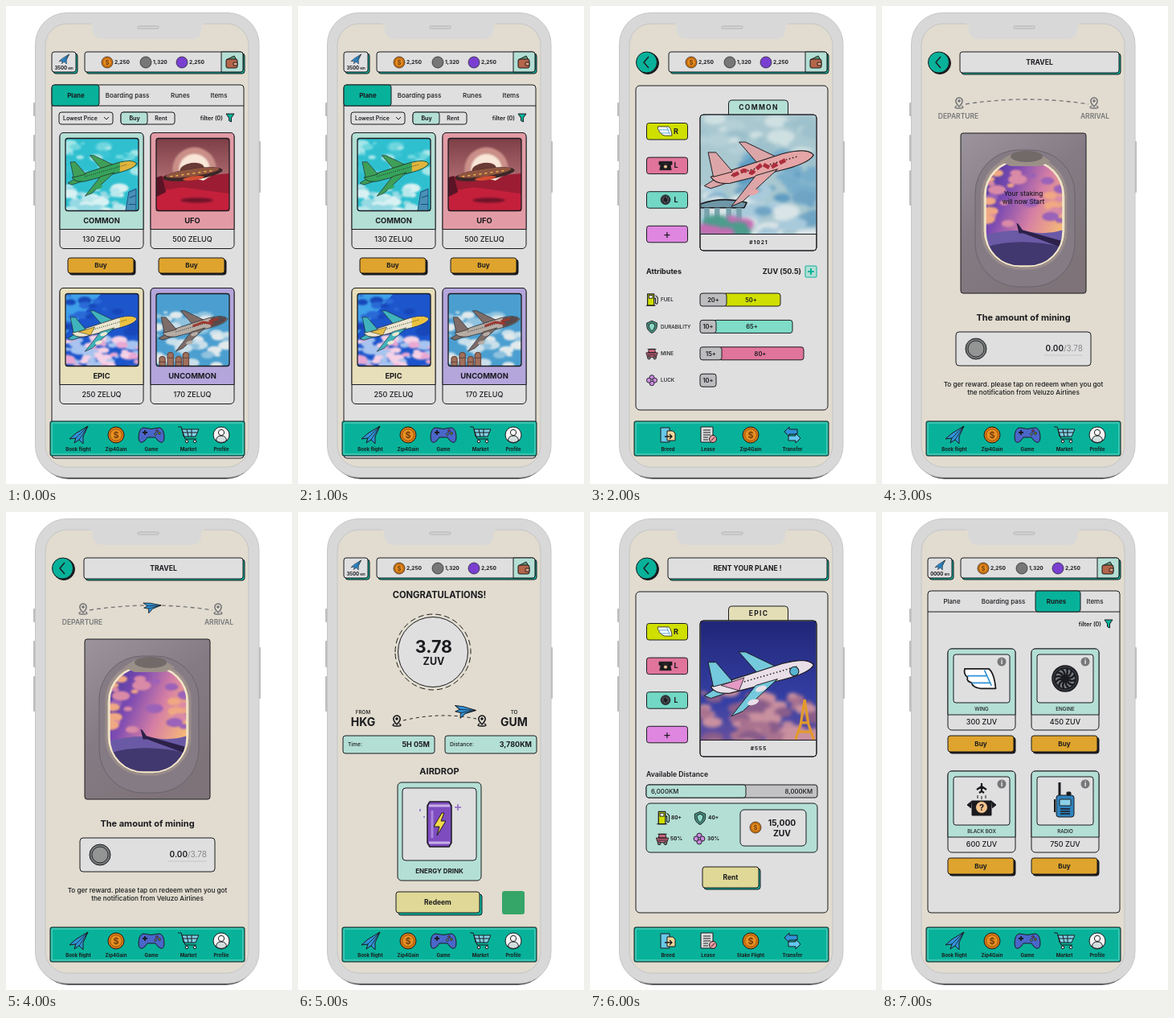
Recreate the animation shown at these times as an HTML page. Size 356 by 594 pixels, loop 8 s.

```html
<!DOCTYPE html>
<html lang="en">
<head>
<meta charset="utf-8">
<title>Flight game app</title>
<style>
html, body { margin: 0; width: 100%; height: 100%; overflow: hidden; background: #fff; }
svg { display: block; }
#stage { width: 356px; height: 594px; font-family: Inter, "Open Sans", sans-serif; }
.soft { filter: blur(1.2px); }
</style>
</head>
<body>
<svg id="stage" viewBox="0 0 356 594"></svg>
<script>
const ink = '#1b1b1f', grey = '#dfdfe0', teal = '#08b29a', mint = '#b4dfd5', gold = '#dea42d', shell = '#d8d8d9',
  khaki = '#dfd896', lime = '#cfdf00', pink = '#e0749a', violet = '#df86e0', blue = '#2f92d6', cream = '#e1dccf';

// Drawing helpers
const rect = (x, y, w, h, fill, r = 4, stroke = ink, sw = 1) =>
  `<rect x="${x}" y="${y}" width="${w}" height="${h}" rx="${r}" fill="${fill}" stroke="${stroke}" stroke-width="${sw}"/>`;
const disc = (x, y, r, fill, stroke = ink, sw = 1) =>
  `<circle cx="${x}" cy="${y}" r="${r}" fill="${fill}" stroke="${stroke}" stroke-width="${sw}"/>`;
const oval = (x, y, rx, ry, fill) => `<ellipse cx="${x}" cy="${y}" rx="${rx}" ry="${ry}" fill="${fill}"/>`;
const path = (d, fill = 'none', stroke = ink, sw = 1, dash = 'none') =>
  `<path d="${d}" fill="${fill}" stroke="${stroke}" stroke-width="${sw}" stroke-dasharray="${dash}" stroke-linejoin="round"/>`;
const text = (x, y, size, s, weight = 700, anchor = 'middle', fill = ink, spacing = 0) =>
  `<text x="${x}" y="${y + size * .36}" font-size="${size}" font-weight="${weight}" text-anchor="${anchor}" fill="${fill}" letter-spacing="${spacing}">${s}</text>`;
const at = (x, y, s, body, turn = 0) => `<g transform="translate(${x} ${y}) rotate(${turn}) scale(${s})">${body}</g>`;
const soft = body => `<g class="soft">${body}</g>`;
const raised = (x, y, w, h, fill, shade, d = 2, r = 3) => rect(x + d, y + d, w, h, shade, r) + rect(x, y, w, h, fill, r);
const picture = (x, y, w, h, body) =>
  `<svg x="${x}" y="${y}" width="${w}" height="${h}" viewBox="0 0 90 ${90 * h / w}">${body}</svg>`;
const gradient = (id, x2, y2, ...colors) => `<linearGradient id="${id}" x2="${x2}" y2="${y2}">${colors.map((c, i) =>
  `<stop offset="${i / (colors.length - 1)}" stop-color="${c}"/>`).join('')}</linearGradient>`;

// Icons, centred on 0,0
const jet = path('M12-11-3-2-11 5-3 4-5 10 1 6 6 11 6 2Z', blue) + path('M12-11-3 4M12-11 1 6', 'none', ink, .8);
const coin = disc(0, 0, 10, '#d9780f') + disc(0, 0, 7.3, '#e88f22', '#8a4b10', .8) + text(0, 0, 11, '$', 600, 'middle', '#6b3a0c');
const gamepad = path('M-10-9Q-16-8-16 4-15 13-8 7L-5 3H5L8 7Q15 13 16 4 16-8 10-9 0-6-10-9Z', '#4a66c8') +
  path('M-11-3h6m-3-3v6', 'none', ink, 1.8) + disc(7, -5, 1.3, pink) + disc(10, -2, 1.3, lime) + disc(5, -1, 1.3, mint);
const cart = path('M-8-7H13L9 2H-6Z', '#7fd0e6') + path('M-13-10h4l5 15H10M-7-3H11M-2-7 0 2M4-7V2') + disc(-2, 8, 1.8, grey) + disc(8, 8, 1.8, grey);
const profile = disc(0, 0, 10, '#f4f4f4') + path('M-6.5 7Q-6 1 0 1T6.5 7Q0 12-6.5 7Z', '#d5dfe0') + disc(0, -3, 3.6, '#fff');
const breed = path('M-9-9H2V9H-9Z', '#69c8e8') + path('M-1-5H6L9-2V7H-1Z', '#f0d79b') + path('M-4 2H5M2-1 5 2 2 5', 'none', ink, 1.3);
const lease = path('M-9-10H6V9H-9Z', '#ddd') + path('M-6-6H3M-6-3H3M-6 0H3M-6 3H0M-6 6H0') + disc(6, 5, 4.5, '#e79aa0') + path('M4 7 8 3');
const transfer = path('M-10-4-4-10V-7H6V-1H-4V2Z', blue) + path('M10 4 4-2V1H-5V7H4V10Z', '#63c7ee');
const fuel = path('M-6-8H3V8H-6Z', lime, ink, 1.3) + rect(-4, -6, 5, 4, '#fff', 0) + path('M-8 8H5M3-2H5V5Q8 7 8 3V-3L5-6', 'none', ink, 1.2);
const shield = path('M0-8 7-5V0Q6 6 0 9-6 6-7 0V-5Z', '#488f80') + path('M0-5 4-3V0Q3 4 0 6-3 4-4 0V-3Z', '#8bd8c5');
const mine = path('M-8-1H8L6 5H-6ZM-5-1-4-6H4L5-1Z', '#c9647c') + disc(-4, 6, 2, '#777') + disc(4, 6, 2, '#777') + path('M-6-6H6M-6 2H6');
const luck = [[0, -4], [4, 0], [0, 4], [-4, 0]].map(p => disc(...p, 3.3, '#ca8be0')).join('') + disc(0, 0, 1.5, '#f0d7f5');
const wing = path('M-12-7H5Q9-4 10 7H-1Q-7 6-7 3Q-11 2-10-1-13-3-12-7Z', '#fff') + path('M-10-2H4M-7 3H6M2-6 7 5', 'none', blue);
const blackBox = path('M-7-2H7L9 7H-9ZM-10-6H10V-1H6V-3H-6V-1H-10Z', ink) + disc(0, 2, 3, '#f4c590');
const engine = disc(0, 0, 10, '#34383f') + disc(0, 0, 8, '#777c84') +
  Array.from({ length: 12 }, (_, i) => at(0, 0, 1, path('M0-2Q3-4 1-8', 'none', ink, 1.5), i * 30)).join('') + disc(0, 0, 2.5, ink);
const mystery = path('M-12 0H12V18H-12Z', ink) + path('M-12 0-18 5-13 9M12 0 18 5 13 9', ink) + disc(0, 8, 7.5, '#f5c48e') + text(0, 8, 11, '?') +
  path('M0-22V-11M-6-14 0-18 6-14M-3-10 0-12 3-10', 'none', ink, 2.2) + path('M-5-7v4M0-6v4M5-7v4');
const radio = rect(-11, -7, 22, 27, '#2f83bd', 3) + rect(-7, -2, 14, 8, '#8bd1e7', 1) + path('M-7-7V-23', 'none', ink, 3) + rect(2, -11, 5, 4, ink, 1) +
  path('M-6 10H6M-6 13H6M-6 16H6', 'none', ink, 1.4) + path('M-13-2V14', 'none', ink, 2);
const can = path('M-12-28H12L15-23V23L12 28H-12L-15 23V-23Z', '#7f4cc0', ink, 1.5) + path('M-13-23H13M-13 23H13', 'none', '#c7b1e8', 3) +
  path('M-9-17V17', 'none', '#a985dd', 3) + path('M3-14-7 3H0L-3 14 8-4H2L6-14Z', '#f4d94c') +
  path('M23-25V-17M19-21H27M-24-19v3M-19-10v2', 'none', '#8b68c4', 1.5);
const wallet = path('M-7-3 3-8 6-3Z', '#5e9e76') + rect(-7, -4, 14, 11, '#b5654a', 2) + rect(2, 0, 5, 4, '#e3a17e', 1);
const funnel = path('M-5-5H5L1.5 0V5L-1.5 3.5V0Z', teal);
const pin = color => path('M0 4Q-5-1-4-4T0-7 4-4 0 4Z', 'none', color, 1.6) + disc(0, -3, 1.3, color, color) + path('M-3 3Q-8 6 0 6T3 3', 'none', color, 1.4);

// Pictures, 90 units wide
const airliner = (body, trim, nose = body, detail = '') =>
  path('M44 37 30 21 35 21 60 33Z', trim, ink, .6) + path('M11 50 3 55 8 57 23 52Z', trim, ink, .6) +
  path('M8 48 64 30Q83 25 88 31 85 37 66 42L23 53Q11 54 8 48Z', body, ink, .7) +
  path('M67 30Q83 26 87 31 84 37 67 41Z', nose, 'none') +
  path('M10 48 6 29H12L25 44Z', trim, ink, .6) + path('M43 47 60 42 33 67 24 71Z', trim, ink, .6) +
  at(41, 60, 1, oval(0, 0, 4.5, 2.1, body) + oval(9, -8, 4.5, 2.1, body), -18) +
  path('M24 47 76 32', 'none', ink, .9, '1 1.6') + detail;
function clouds(seed, count, left, right, top, bottom, ...colors) {
  const random = () => (seed = seed * 16807 % 2147483647) / 2147483647;
  let out = '';
  for (let i = 0; i < count; i++) {
    const y = top + (bottom - top) * i / count, r = 2 + random() * 6;
    out += oval(left + random() * (right - left), y + random() * 5, r * 1.4, r * .75, colors[i % colors.length]);
  }
  return soft(out);
}
const sky = fill => rect(0, 0, 90, 125, fill, 0, 'none');
const tower = (x, top) => path(`M${x} 90V${top}Q${x + 3.5} ${top - 4} ${x + 7} ${top}V90ZM${x - 1} ${top + 5}H${x + 8}`, '#a0705c', '#6b4b42', 1.3);
const art = {
  common: sky('#2fc0d0') + clouds(17, 28, 0, 90, 2, 40, '#6fd6de', '#a5e6e8', '#3cc4d4') + clouds(31, 36, 0, 75, 58, 90, '#d8f1f2', '#95d9e3', '#b9e8ec') +
    airliner('#36a35c', '#3f9f58', '#e0b43c') + path('M74 90 78 66 87 62V90M79 73 87 70M78 81H87', '#4a91b7', '#1b4f7d'),
  ufo: sky('url(#dusk)') + soft(disc(47, 38, 27, '#c98f88', 'none') + disc(47, 38, 19, '#f8e6d6', 'none')) +
    path('M0 50 13 45 26 52 40 47 58 52 70 45 90 43V90H0Z', '#9c1c33', 'none') + path('M0 65 32 60 90 68V90H0Z', '#c4203c', 'none') +
    path('M0 48 7 46 12 66 0 72Z', '#5a1426', 'none') + soft(oval(50, 76, 20, 3, '#6f1429')) +
    at(45, 44, 1, oval(0, -6, 15, 8, '#6a3a35') + oval(0, 0, 37, 7, '#3c2728') + oval(0, -2, 33, 4.5, '#8f5540') +
      path('M-28-1H28', 'none', '#eab44e', 1.5, '3 4') + oval(0, 5, 13, 2.5, '#d34d31'), -8),
  epic: sky('#1c55cc') + path('M0 0H44L0 50Z', '#3fa0ea', 'none') + clouds(8, 18, 0, 90, 2, 48, '#2a6ad6', '#1747b8') +
    clouds(42, 56, 0, 90, 52, 90, '#e9a8d3', '#f5d1e6', '#a6c4ef') + airliner('#ebe6cf', '#3fb3bd', '#ecc23e', path('M16 47 36 41 31 51Z', '#e4bd44', ink, .5)),
  uncommon: sky('#4b9fd0') + clouds(77, 50, 0, 90, 22, 90, '#c9dfea', '#8fc2de', '#e1e9eb') +
    airliner('#b5aca4', '#7d6c68', '#57494b', path('M45 40 58 35 70 37M65 34 76 31', 'none', '#9c3932', 3)) +
    [4, 14, 24, 33].map((x, i) => tower(x, 79 - i % 2 * 5)).join(''),
  pinkPlane: sky('#a9c8d0') + clouds(19, 30, 0, 90, 1, 30, '#b4cfd6', '#cfe0e2', '#9cc0cc') + clouds(4, 30, 35, 90, 28, 62, '#5f9cc2', '#79aecb') +
    clouds(61, 50, 0, 90, 56, 92, '#d9e4e7', '#a8cadb', '#6fa4c4') + path('M0 69Q18 63 36 68L34 72H0Z', '#6f97a8') +
    path('M5 72V90M13 72V90M22 72V90M30 72V90', 'none', '#78a3ae', 4) + clouds(5, 20, 0, 36, 80, 90, '#4d9c8c', '#c36eb3') +
    airliner('#e5a4a5', '#dca6a8', '#e5a4a5', path('M25 47 34 43 40 45 48 38 54 41 66 35', 'none', '#ad2d3c', 3, '5 2')),
  nightPlane: sky('url(#night)') + clouds(23, 62, 0, 90, 54, 94, '#a9728f', '#c9909f', '#895d8a') +
    at(0, 3, 1, airliner('#e9dfe8', '#75c9dc', '#e9dfe8', path('M16 47 34 41 30 51Z', '#e49ac4', ink, .5) + disc(73, 36, 3.5, '#59b5d3', ink, .7))) +
    path('M81 61 78 80 74 92M81 61 84 80 88 92M78 79H84M76 86H86', 'none', '#e29a2e', 2),
};

// Shared parts
const wealth = raised(98, 57, 197, 25, grey, teal) + path('M268 57H292Q295 57 295 60V79Q295 82 292 82H268Z', mint) + at(281, 70, 1, wallet) +
  at(126, 70, .7, coin) + disc(174, 70, 7, '#777', ink, .7) + disc(219, 70, 7, '#7a3fd0', ink, .7) +
  ['2,250', '1,320', '2,250'].map((s, i) => text([135, 183, 228][i], 70, 6.6, s, 700, 'start')).join('');
const header = title => disc(72, 71, 13.5, ink) + disc(70.5, 70, 13, teal) + path('M73 63 67 70 73 77', 'none', ink, 1.4) +
  (title ? raised(97, 57, 198, 26, grey, teal) + text(196, 70, 8.6, title) : wealth);
const status = km => raised(57, 57, 30, 25, grey, teal) + at(72, 66, .55, jet) + text(72, 77, 6, `${km} <tspan font-size="4">km</tspan>`) + wealth;
const navBar = items => rect(55, 516, 242, 43, teal, 2) + rect(57, 518, 238, 39, 'none', 1, '#8fe0d1', .8) +
  items.map(([x, icon, label]) => at(x, 533, 1, icon) + text(x, 551, 6, label)).join('');
const mainNav = navBar([[90, jet, 'Book flight'], [137, coin, 'Zip4Gain'], [181, gamepad, 'Game'], [227, cart, 'Market'], [268, profile, 'Profile']]);
const planeNav = label => navBar([[97, breed, 'Breed'], [147, lease, 'Lease'], [200, coin, label], [252, transfer, 'Transfer']]);
const tabs = (x, w, active, bottom) => rect(57, 98, 239, bottom - 98, grey) + path('M57 124H296') + rect(x, 98, w, 26, teal, 3) +
  ['Plane', 'Boarding pass', 'Runes', 'Items'].map((s, i) => text([87, 151, 217, 265][i], 111.5, 8, s, i === active ? 700 : 500)).join('');
const filter = x => text(x, 139, 7.2, 'filter (0)', 600, 'end') + at(x + 9, 139, 1, funnel);
const buy = (x, y, w, h) => raised(x, y, w, h, gold, ink) + text(x + w / 2, y + h / 2, 8.2, 'Buy');

function planeView(y, tab, tabColor, number, image) {
  const slots = [[lime, wing, 'R'], [pink, blackBox, 'L'], ['#72d8c5', at(0, 0, .75, engine), 'L'], [violet, '', '+']];
  return rect(172.5, 117, 74, 24, tabColor) + text(210, 126, 8.5, tab, 700, 'middle', ink, 1.3) + rect(137, 135, 145, 169, grey) +
    picture(137.5, 135.5, 144, 148, image) + rect(137, 135, 145, 169, 'none') + path('M137 283.5H282') +
    text(210, 294, 6.7, number, 700, 'middle', ink, .9) +
    slots.map(([color, icon, label], i) => rect(70.5, y + i * 42.6, 51, 20.5, color, 3) + at(94, y + 10 + i * 42.6, .8, icon) +
      text(icon ? 107 : 96, y + 10 + i * 42.6, icon ? 9 : 15, label, icon ? 700 : 400)).join('');
}

// Screens
function market() {
  const card = (x, y, color, name, price, image) => rect(x, y, 104, 144, grey, 5) +
    path(`M${x} ${y + 120}V${y + 5}q0-5 5-5h94q5 0 5 5v115Z`, color) + picture(x + 7, y + 7, 91, 90, image) +
    rect(x + 7, y + 7, 91, 90, 'none', 3, ink, 1.3) + text(x + 52, y + 109, 9.3, name) + text(x + 52, y + 132, 9, price + ' ZELUQ', 500);
  return status(3500) + tabs(57, 59, 0, 562) + rect(66, 132, 67, 15, grey, 3) + text(71, 139.5, 6.9, 'Lowest Price', 600, 'start') +
    path('M122 138 125 141 128 138') + rect(143, 132, 67, 15, grey, 3) + rect(143, 132, 33, 15, mint, 3) +
    text(160, 139.5, 7, 'Buy') + text(193, 139.5, 7, 'Rent', 600) + filter(270) +
    card(67, 157.5, mint, 'COMMON', 130, art.common) + card(180, 157.5, '#e29ba5', 'UFO', 500, art.ufo) +
    buy(77, 313, 82, 19) + buy(190, 313, 82, 19) +
    card(67, 350.5, '#e7dfba', 'EPIC', 250, art.epic) + card(180, 350.5, '#b4a5db', 'UNCOMMON', 170, art.uncommon) + mainNav;
}

function details() {
  const rows = [['FUEL', fuel, 33, 20, 67, 50, lime], ['DURABILITY', shield, 20, 10, 95, 65, '#7edcc8'],
    ['MINE', mine, 27, 15, 102, 80, pink], ['LUCK', luck, 20, 10, 0]];
  return header() + rect(57, 99, 239, 403, grey, 5) + planeView(145.5, 'COMMON', mint, '#1021', art.pinkPlane) +
    text(70, 330, 9, 'Attributes', 700, 'start') + text(263, 330, 9, 'ZUV (50.5)', 700, 'end') +
    rect(268, 323, 14, 14, mint, 1, teal) + path('M271 330H279M275 326V334', 'none', teal, 2) +
    rows.map(([name, icon, base, n, extra, m, color], i) => {
      const y = 365 + i * 33.4;
      return at(77, y, .9, icon) + text(88, y, 6.3, name, 500, 'start') +
        (extra ? rect(137 + base - 4, y - 8, extra + 4, 16, color, 3) + text(137 + base + extra / 2 - 3, y, 7.5, m + '+', 600) : '') +
        rect(137, y - 8, base, 16, '#bdbdc0', 3) + text(137 + base / 2, y, 7.5, n + '+', 600);
    }).join('') + planeNav('Zip4Gain');
}

function travel(flying) {
  const dim = '#77767a';
  const view = sky('url(#sunset)') + clouds(12, 26, 0, 90, 8, 72, '#9a62b8', '#d98aa6', '#f0a883') +
    path('M0 86Q30 78 50 82T90 80V125H0Z', '#6a5aa6', 'none') + path('M0 100Q40 88 90 100V125H0Z', '#41386f', 'none') +
    path('M36 72 38 73 43 80 90 93V101L44 84 39 84Z', '#2c2148', 'none');
  return header('TRAVEL') + at(96, 121, 1, pin(dim)) + at(264, 121, 1, pin(dim)) + path('M104 122Q180 110 257 122', 'none', dim, 1.3, '5 4') +
    (flying ? at(180, 116, .8, jet, 42) : '') + text(95, 137, 8.5, 'DEPARTURE', 600, 'middle', dim) + text(265, 137, 8.5, 'ARRIVAL', 600, 'middle', dim) +
    rect(98, 158, 156, 199, 'url(#cabin)', 3) + rect(116, 179, 124, 170, '#857b84', 54, '#6b636b') + soft(rect(124, 187, 106, 140, '#a4968f', 48, 'none')) +
    rect(126, 190, 102, 135, '#e9dcbf', 46, '#897b7d') + `<g clip-path="url(#pane)">${picture(129, 193, 96, 130, view)}</g>` +
    rect(129, 193, 96, 130, 'none', 42, '#f4e8ca', 1.5) + path('M147 193Q177 168 210 193L197 199H160Z', '#9b9088', 'none') + oval(180, 187, 20, 7, '#716a69') +
    (flying ? '' : text(176, 233.5, 8.2, 'Your staking', 500) + text(176, 243.5, 8.2, 'will now Start', 500)) +
    text(176, 387, 11, 'The amount of mining') + rect(92, 405, 168, 42, grey) + disc(117, 426, 13, '#777a7a') + disc(117, 426, 10, '#929594', ink, .8) +
    text(250, 425, 10, '<tspan font-weight="600">0.00</tspan><tspan fill="#88888b">/3.78</tspan>', 400, 'end') +
    path('M202 434H250', 'none', '#c5c5c8') + text(176, 470, 8.2, 'To ger reward. please tap on redeem when you got', 500) +
    text(176, 480.5, 8.2, 'the notification from Veluzo Airlines', 500) + mainNav;
}

function arrival() {
  const fact = (x, label, value) => rect(x, 278, 114, 22, mint, 3) + text(x + 6, 289, 6.7, label, 500, 'start') + text(x + 108, 289, 9, value, 700, 'end');
  return status(3500) + text(176, 103, 11.2, 'CONGRATULATIONS!') + path('M121 174a47 47 0 1 1 94 0a47 47 0 1 1-94 0', 'none', ink, 1, '7 4') +
    disc(168, 174, 43.5, grey) + text(169, 167, 21.5, '3.78') + text(169, 185, 12.5, 'ZUV') +
    text(81, 249, 6.3, 'FROM', 500) + text(81, 261, 14, 'HKG') + text(269, 249, 6.3, 'TO', 500) + text(269, 261, 14, 'GUM') +
    at(123, 260, 1, pin(ink)) + at(229, 260, 1, pin(ink)) + path('M131 259Q178 248 222 257', 'none', ink, 1, '4 4') + at(206, 245, .95, jet, 48) +
    fact(56, 'Time:', '5H 05M') + fact(183, 'Distance:', '3,780KM') + text(176, 322, 11, 'AIRDROP') +
    rect(124, 336, 104, 122, mint, 5) + rect(130, 343, 92, 90, grey) + at(176, 388, 1, can) + text(176, 446, 8, 'ENERGY DRINK') +
    raised(122, 472, 104, 26, khaki, teal, 3) + text(174, 485, 8.5, 'Redeem') + rect(254, 471, 28, 29, '#36a568', 3, 'none') + mainNav;
}

function rent() {
  const stat = (x, y, icon, s) => at(x, y, .95, icon) + text(x + 10, y, 6.5, s, 700, 'start');
  return header('RENT YOUR PLANE !') + rect(57, 99, 239, 399, grey, 5) + planeView(138.5, 'EPIC', '#e3deb6', '#555', art.nightPlane) +
    text(70, 326, 8.7, 'Available Distance', 600, 'start') + rect(70, 339, 213, 16, '#c2c2c5', 3) + rect(70, 339, 124, 16, mint, 3) +
    text(76, 347, 7.8, '6,000KM', 500, 'start') + text(277, 347, 7.8, '8,000KM', 500, 'end') + rect(70, 362, 213, 61, mint, 5) +
    stat(91, 380, fuel, '80+') + stat(137, 380, shield, '40+') + stat(90, 406, mine, '50%') + stat(136, 406, luck, '30%') +
    rect(187, 370, 82, 45, grey, 5) + at(206, 392, .7, coin) + text(239, 386, 10.3, '15,000') + text(239, 399, 10.3, 'ZUV') +
    raised(140, 441, 70, 26, khaki, teal) + text(175, 454, 8.5, 'Rent') + planeNav('Stake Flight');
}

function runes() {
  const card = (x, y, name, price, icon, scale) => rect(x, y, 84, 101, grey, 5) +
    path(`M${x} ${y + 82}V${y + 5}q0-5 5-5h74q5 0 5 5v77Z`, mint) + rect(x + 7, y + 7, 70, 60, grey, 3) + at(x + 42, y + 37, scale, icon) +
    disc(x + 67, y + 16, 5.5, '#77777a', 'none') + text(x + 67, y + 16, 8, 'i', 700, 'middle', '#fff') +
    text(x + 42, y + 74.5, 6.3, name, 500) + text(x + 42, y + 91, 9, price + ' ZUV', 500) + buy(x, y + 108, 82, 20);
  return status('0000') + tabs(191, 56, 2, 498) + filter(273) + card(82, 170, 'WING', 300, wing, 1.75) + card(186, 170, 'ENGINE', 450, engine, 1.6) +
    card(82, 322, 'BLACK BOX', 600, mystery, 1) + card(186, 322, 'RADIO', 750, radio, 1) + mainNav;
}

const sideButton = (x, y, h) => rect(x, y, 4, h, '#bdbdbf', 1, 'none');
const phone = sideButton(34, 120, 17) + sideButton(34, 160, 33) + sideButton(34, 204, 44) + sideButton(313, 168, 64) +
  rect(40, 14, 272, 574, '#5c5c5f', 38, 'none') + rect(36.5, 8.5, 278.5, 577, shell, 39, '#c6c6c8') +
  rect(49, 22, 253, 551, cream, 27, '#c4c4c6');
const notch = path('M103 21Q108 22 108 28 109 41 121 41H231Q243 41 243 28 243 22 249 21Z', shell, 'none') + rect(164, 25, 26, 3, shell, 1.5, '#a5a5a8', .8);

const scenes = [market(), market(), details(), travel(false), travel(true), arrival(), rent(), runes()];
const stage = document.getElementById('stage');
stage.innerHTML = `<defs>${gradient('dusk', 0, 1, '#7d3f47', '#b9757a', '#a02c3c')}${gradient('night', 0, 1, '#202677', '#3540a5', '#9c6198')}
  ${gradient('sunset', 1, .6, '#41379a', '#7d4bb2', '#d780a4', '#f5b878')}${gradient('cabin', .6, 1, '#9c949d', '#857b84', '#7d7378')}
  <clipPath id="pane">${rect(129, 193, 96, 130, '#000', 42)}</clipPath></defs>${phone}` +
  scenes.map(s => `<g class="scene">${s}</g>`).join('') + notch;
const groups = stage.querySelectorAll('.scene');

function draw() {
  const current = Math.floor(performance.now() / 1000) % scenes.length;
  groups.forEach((g, i) => g.setAttribute('display', i === current ? 'inline' : 'none'));
  requestAnimationFrame(draw);
}
draw();
</script>
</body>
</html>
```
